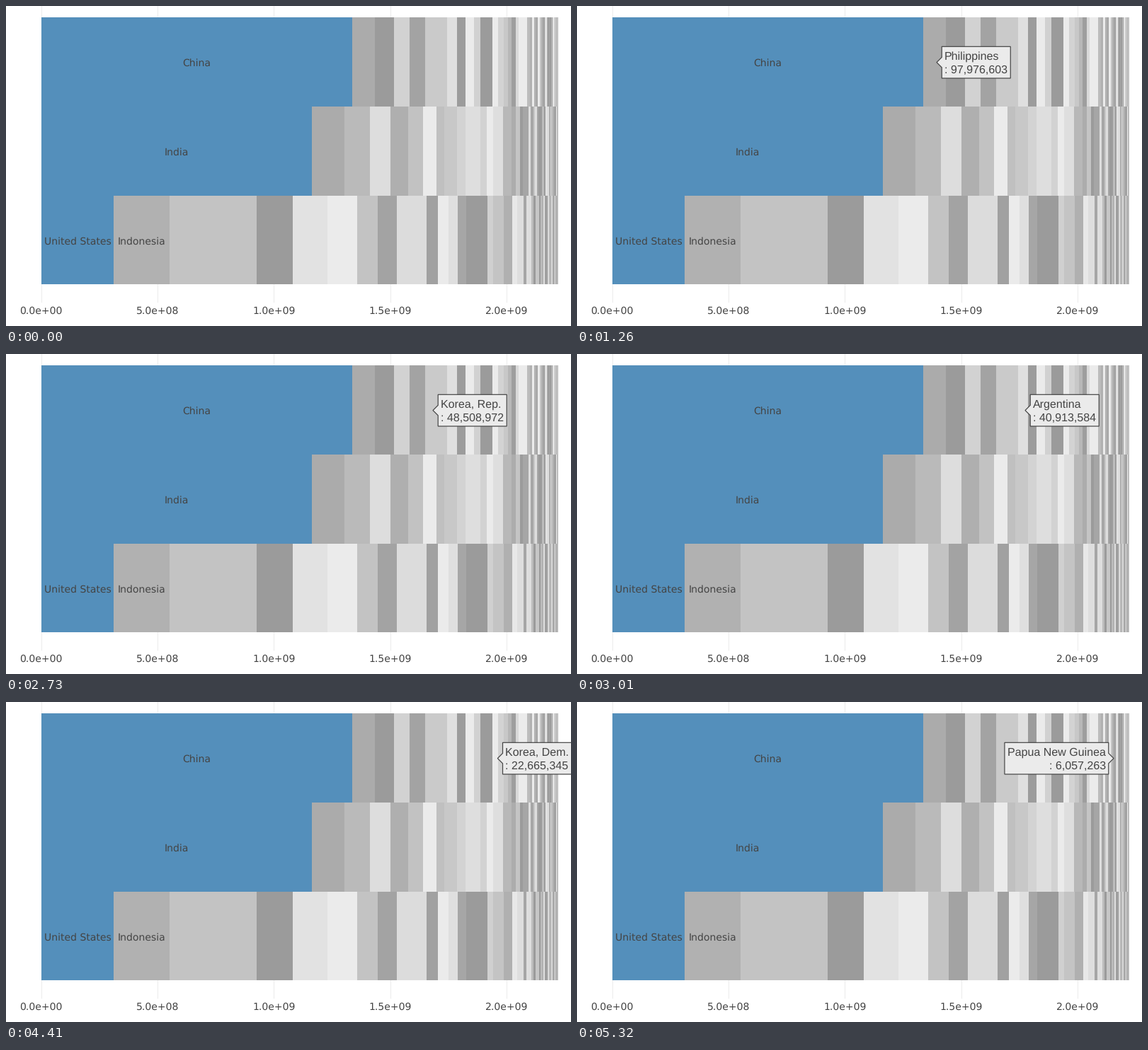
Animation of 798 by 452 pixels, one loop 5390 ms. Source, as a matplotlib script:

```python
import random

import matplotlib.pyplot as plt
from matplotlib.animation import FuncAnimation
from matplotlib.patches import Polygon, Rectangle

W, H, DPI = 798, 452, 64  # a power of two keeps the pixel size exact
STEP, FRAMES = 70, 77
PX = 72 / DPI
LEFT, RIGHT = 49.5, 780.3
TOP, ROW_H = 16.4, 125.65
BLUE, INK, PAPER = "#548fbb", "#444444", "#ebebeb"

plt.rcParams["text.hinting"] = "none"
plt.rcParams["text.hinting_factor"] = 1

# Each row: end of the blue bar, then (right edge, grey level) pairs
ROWS = [
    (488.6, [(521.3, 171), (547.5, 155), (570.3, 210), (591.5, 163),
             (623.3, 202), (636.8, 223), (649.3, 156), (660.5, 235),
             (670.3, 209), (687.3, 155), (695, 235), (702.5, 211),
             (709, 200), (714, 184), (719.5, 158), (724, 217)]),
    (432, [(477.5, 171), (514, 186), (542.6, 221), (567.7, 175),
           (589, 194), (608.4, 235), (619, 192), (637, 200),
           (649, 211), (670, 222), (679, 210), (688, 235),
           (702, 222), (714, 184), (720, 172), (726, 196)]),
    (152.3, [(231, 177), (354.3, 195), (405.4, 155), (454, 226),
             (496.3, 235), (525, 195), (552, 163), (593.5, 220),
             (609.5, 161), (625, 235), (638, 223), (649.5, 166),
             (679.5, 155), (688, 208), (703, 196), (714.5, 176),
             (722, 232)]),
]

LABELS = [(269, 84.6, "China"), (240.5, 210.6, "India"),
          (101.3, 336.6, "United States"), (191.8, 336.6, "Indonesia")]

# Start time in ms, pointer x, name, population
HOVERS = [
    (1260, 508, "Philippines", 97976603),
    (1960, 537, "Egypt, Arab Rep.", 83082869),
    (2240, 562, "Congo, Dem. Rep.", 68692542),
    (2450, 583.5, "France", 64420073),
    (2730, 603, "Korea, Rep.", 48508972),
    (2870, 618.7, "Ukraine", 45700395),
    (3010, 633, "Argentina", 40913584),
    (3290, 646, "Poland", 38482919),
    (3500, 658, "Algeria", 34178188),
    (4130, 678, "Nepal", 28563377),
    (4270, 694.3, "Korea, Dem. Rep.", 22665345),
    (4620, 701.5, "Sri Lanka", 21324791),
    (4760, 709, "Chile", 16601707),
    (4830, 720, "Kazakhstan", 15399437),
    (5040, 725, "Ecuador", 14573101),
    (5110, 730, "Senegal", 13711597),
    (5180, 738, "Cuba", 11451652),
    (5250, 749, "Austria", 8210281),
    (5320, 758, "Papua New Guinea", 6057263),
]
FLIP_X = 735

fig = plt.figure(figsize=(W / DPI, H / DPI), dpi=DPI, facecolor="white")
ax = fig.add_axes([0, 0, 1, 1])
ax.set(xlim=(0, W), ylim=(H, 0))
ax.axis("off")


def write(x, y, text, size, font, ha="center", **kw):
    return ax.text(x, y, text, fontsize=size * PX, family=font, color=INK,
                   ha=ha, va="baseline", **kw)


def bar(x, row, color):
    """Fill from x to the right end; later bars cover the rest."""
    ax.add_patch(Rectangle((x, TOP + row * ROW_H), RIGHT - x, ROW_H,
                           fc=color, lw=0))


def tail(x, rng):
    """Ever narrower bars up to the right end."""
    while x < RIGHT - 0.4:
        yield x, rng.choice((155, 166, 177, 188, 198, 209, 222, 235))
        x += max(0.45, 0.08 * (RIGHT - x))


def draw_chart():
    for i in range(5):
        x = LEFT + 164.4 * i
        ax.plot([x, x], [0, 418], color="#ececec", lw=1.1 * PX, zorder=0)
        write(x, 435, f"{i * 5e8:.1e}", 14.4, "DejaVu Sans")
    rng = random.Random(11)
    for row, (start, cells) in enumerate(ROWS):
        bar(LEFT, row, BLUE)
        x = start
        for edge, grey in cells:
            bar(x, row, str(grey / 255))
            x = edge
        for x, grey in tail(x, rng):
            bar(x, row, str(grey / 255))
    for x, y, name in LABELS:
        write(x, y, name, 14.4, "DejaVu Sans")


draw_chart()
bubble = ax.add_patch(Polygon([(0, 0), (1, 1), (1, 0)], fc=PAPER, ec=INK,
                              lw=1.2 * PX, joinstyle="miter", zorder=5))
lines = [write(0, y, "", 15.5, "Liberation Sans", "left", zorder=6)
         for y in (75.2, 95.2)]


def update(i):
    past = [h for h in HOVERS if h[0] <= i * STEP]
    for artist in (bubble, *lines):
        artist.set_visible(bool(past))
    if past:
        _, tip, name, count = past[-1]
        side = -1 if tip > FLIP_X else 1
        for line, text in zip(lines, (name, f": {count:,}")):
            line.set_text(text)
            line.set_ha("left" if side > 0 else "right")
            line.set_x(tip + side * 10.8)
        width = max(t.get_window_extent().width for t in lines) + 8
        near, far = tip + side * 7.2, tip + side * (7.2 + width)
        bubble.set_xy([(tip, 79.6), (near, 72.4), (near, 57.3), (far, 57.3),
                       (far, 102), (near, 102), (near, 86.8)])
    return [bubble, *lines]


anim = FuncAnimation(fig, update, frames=FRAMES, interval=STEP,
                     repeat=True, repeat_delay=0)
plt.show()
```
